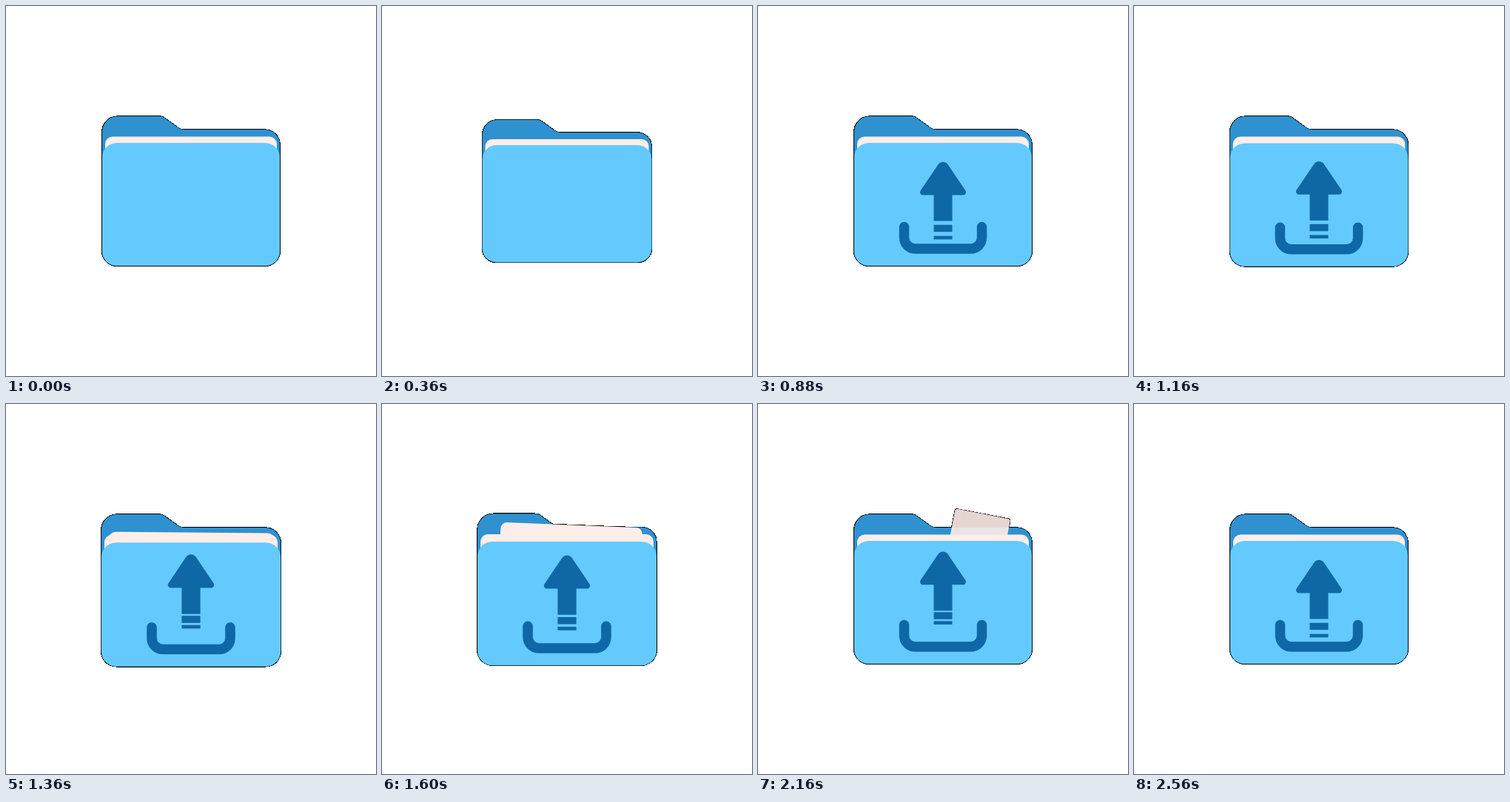
Recreate the animation shown at these times as an HTML page with a canvas. Size 500x500 px, loop 2920 ms.

```html
<!DOCTYPE html>
<html lang="en">
<head>
<meta charset="utf-8">
<title>Folder upload</title>
<style>
  html, body { margin: 0; width: 100%; height: 100%; overflow: hidden; background: #fff; }
  canvas { display: block; width: 500px; height: 500px; }
</style>
</head>
<body>
<canvas id="stage" width="500" height="500"></canvas>
<script>
const ctx = document.getElementById('stage').getContext('2d', { willReadFrequently: true });
const LOOP = 2920, STEP = 40;
const BACK = '#2f91d0', FRONT = '#64cafd', PAPER = '#feeee9', ICON = '#0f68a6';

const clamp = x => Math.min(1, Math.max(0, x));
const span = (t, a, b) => clamp((t - a) / (b - a));
const smooth = p => p * p * (3 - 2 * p);
const ease = (t, a, b) => smooth(span(t, a, b));
const bump = p => Math.sin(Math.PI * p) ** 2;
const pulse = (t, a, b, c, d) => ease(t, a, b) - ease(t, c, d);

function backShape() {
  const p = new Path2D();
  p.moveTo(130, 332);
  p.lineTo(130, 170);
  p.arcTo(130, 149, 151, 149, 21);
  p.lineTo(208, 149);
  p.quadraticCurveTo(211, 149, 214, 151);
  p.lineTo(232, 164);
  p.quadraticCurveTo(236, 167, 240, 167);
  p.lineTo(350, 167);
  p.arcTo(370, 167, 370, 187, 20);
  p.lineTo(370, 332);
  p.arcTo(370, 351, 350, 351, 19);
  p.lineTo(150, 351);
  p.arcTo(130, 351, 130, 331, 19);
  p.closePath();
  return p;
}

function box(x, y, w, h, r) {
  const p = new Path2D();
  p.roundRect(x, y, w, h, r);
  return p;
}

function headShape() {
  const p = new Path2D();
  p.moveTo(250, 255.5);
  p.arcTo(284.5, 255.5, 250, 204.5, 4);
  p.arcTo(250, 204.5, 215.5, 255.5, 8);
  p.arcTo(215.5, 255.5, 250, 255.5, 4);
  p.closePath();
  return p;
}

function trayShape() {
  const p = new Path2D();
  p.moveTo(197.5, 298.5);
  p.arcTo(197.5, 328, 250, 328, 15);
  p.arcTo(302.5, 328, 302.5, 298.5, 15);
  p.lineTo(302.5, 298.5);
  return p;
}

const back = backShape();
const front = box(130, 185, 240, 166, 20);
const sheet = box(134, 176.5, 232, 165, 10);
const head = headShape();
const tray = trayShape();

function within(move, draw) {
  ctx.save();
  move();
  draw();
  ctx.restore();
}

function zoom(s, dy) {
  ctx.translate(250, 250 + dy);
  ctx.scale(s, s);
  ctx.translate(-250, -250);
}

function fill(shape, color) {
  ctx.fillStyle = color;
  ctx.fill(shape);
}

function outline(shape, scale = 1) {
  ctx.strokeStyle = '#000';
  ctx.lineWidth = 1.5 / scale;
  ctx.stroke(shape);
}

function folderScale(t) {
  return 1 - 0.05 * bump(span(t, 40, 600))
    + 0.005 * bump(span(t, 600, 880))
    + 0.0095 * pulse(t, 1080, 1350, 1500, 1900);
}

function drawIcon(t) {
  const q = ease(t, 410, 880);
  if (q <= 0) return;
  const traySize = 1 - (1 - q) ** 2.6;
  within(() => {
    ctx.translate(250, 212 + 101.5 * q);
    ctx.scale(traySize, traySize);
    ctx.translate(-250, -313.5);
  }, () => {
    ctx.strokeStyle = ICON;
    ctx.lineWidth = 13.5;
    ctx.lineCap = 'round';
    ctx.stroke(tray);
  });

  // The arrow bobs twice; the lower bars travel further and close up.
  const lift = bump(span(t, 1080, 2560) * 2);
  within(() => {
    ctx.translate(250, 204.7);
    ctx.scale(q, q);
    ctx.translate(-250, -204.7);
    ctx.fillStyle = ICON;
  }, () => {
    within(() => ctx.translate(0, -11.4 * lift), () => {
      ctx.fill(head);
      ctx.fillRect(237.5, 254, 25, 36.5);
    });
    ctx.fillRect(237.5, 295.7 - 14.6 * lift, 25, 9.5);
    ctx.fillRect(237.5, 310.7 - 17.7 * lift, 25, 4.7);
  });
}

// Edges are hard: faint pixels vanish, the rest become opaque over black.
function flatten() {
  const img = ctx.getImageData(0, 0, 500, 500);
  const px = img.data;
  for (let i = 0; i < px.length; i += 4) {
    const a = px[i + 3];
    if (a === 0 || a === 255) continue;
    for (let k = 0; k < 3; k++) px[i + k] *= a / 255;
    px[i + 3] = a < 128 ? 0 : 255;
  }
  ctx.putImageData(img, 0, 0);
}

function draw(t) {
  ctx.clearRect(0, 0, 500, 500);
  const s = folderScale(t);
  const backMove = () => zoom(s, 0.9 * pulse(t, 1080, 1350, 1350, 1650));
  const frontMove = () => zoom(s, 2.8 * pulse(t, 1080, 1350, 1350, 1850));

  // Loose sheet: rises, turns, shrinks and fades.
  const e = ease(t, 1160, 2780);
  const size = 1 - e;
  const alpha = 1 - span(t, 2120, 2520);
  const flying = e > 0 && alpha > 0;
  const sheetMove = () => {
    backMove();
    ctx.translate(250 + 108 * e * e, 259 - 160 * e + 52 * e * e);
    ctx.rotate(e * (0.2 + 0.12 * e));
    ctx.scale(size, size);
    ctx.translate(-250, -259);
    ctx.globalAlpha = alpha;
  };

  // Dark rims first, so that only their outer half stays visible.
  if (flying) within(sheetMove, () => outline(sheet, size));
  within(backMove, () => outline(back));
  within(frontMove, () => outline(front));

  within(backMove, () => fill(back, BACK));
  if (flying) within(sheetMove, () => fill(sheet, PAPER));
  within(backMove, () => fill(sheet, PAPER));
  within(frontMove, () => {
    fill(front, FRONT);
    drawIcon(t);
  });
  flatten();
}

const start = performance.now();
function tick() {
  const t = (performance.now() - start) % LOOP;
  draw(Math.floor(t / STEP) * STEP);
  requestAnimationFrame(tick);
}
tick();
</script>
</body>
</html>
```
